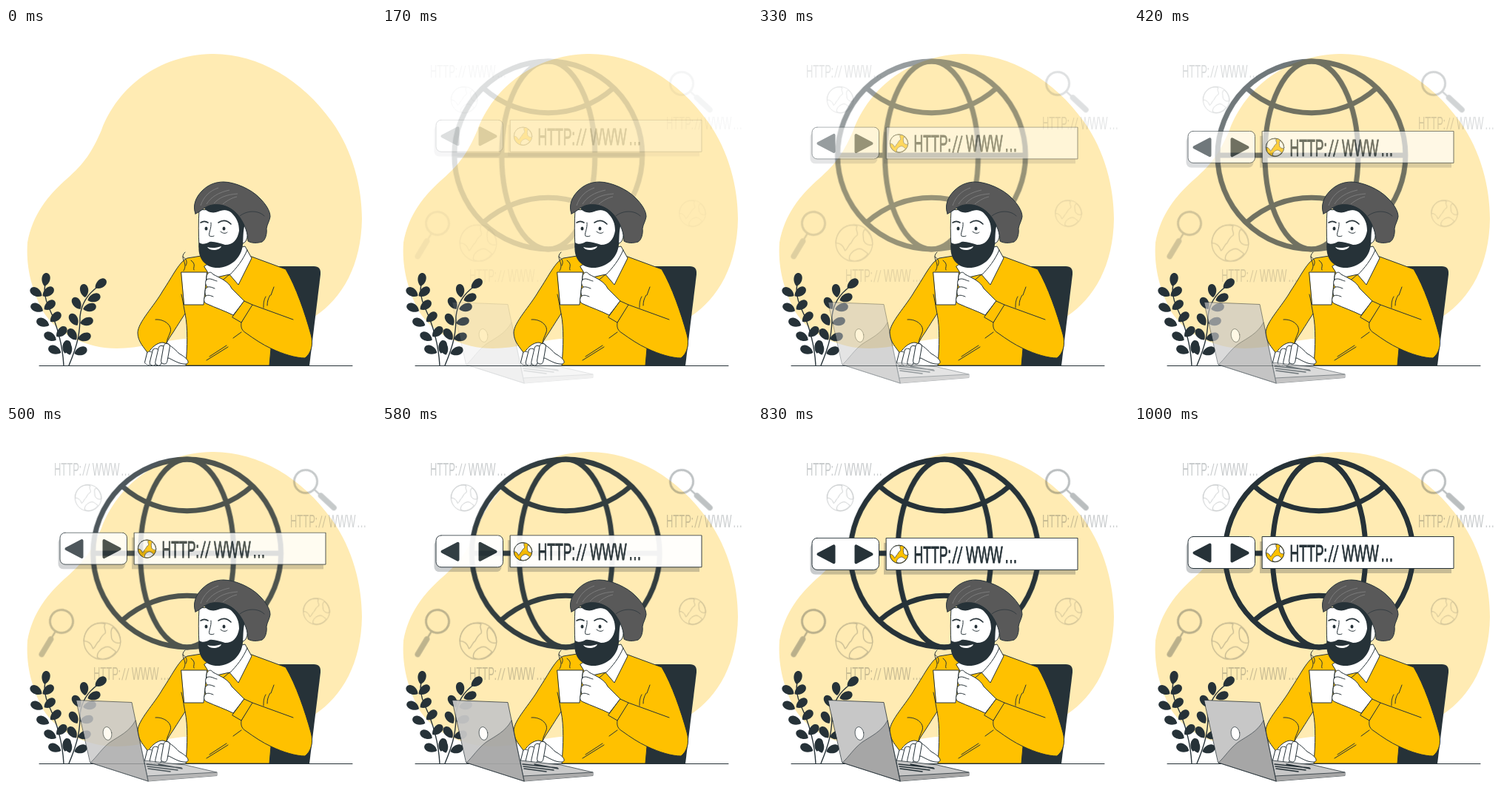
Animation, 500 px wide and 500 px high, one loop 1.04 s. Source, as an HTML page:

```html
<!DOCTYPE html>
<html lang="en">
<head>
<meta charset="utf-8">
<title>Browsing over coffee</title>
<style>
  html, body { margin: 0; width: 100%; height: 100%; overflow: hidden; background: #fff; }
  svg { display: block; width: 100%; height: 100%; }
  :root { --ink: #263238; --sun: #ffc100; --t: 0; }

  .line { fill: none; stroke: var(--ink); stroke-width: 1; stroke-linecap: round; stroke-linejoin: round; }
  .white { fill: #fff; }
  .sun { fill: var(--sun); }
  .ink { fill: var(--ink); }
  .url { font: 32px "Liberation Sans", Arial, sans-serif; }

  /* Scrubbed by --t (seconds), so every part shares one clock. */
  .enter {
    animation: fade 1s cubic-bezier(.36, -.01, .5, 1.38) both paused;
    animation-delay: calc(var(--t) * -1s);
  }
  .right { animation-name: slide-right; }
  .down { animation-name: slide-down; }
  @keyframes fade { from { opacity: 0; } to { opacity: 1; } }
  @keyframes slide-right {
    from { opacity: 0; transform: translateX(-30px); }
    to { opacity: 1; transform: translateX(0); }
  }
  @keyframes slide-down {
    from { opacity: 0; transform: translateY(-30px); }
    to { opacity: 1; transform: translateY(0); }
  }
</style>
</head>
<body>
<svg viewBox="0 0 500 500">
  <defs>
    <path id="leaf" d="M-1 9C-6 5 -7 -3 -4 -7C-1 -11 5 -9 5.500 -3C6 2 3 7 -1 9Z"/>
    <text id="url" class="url" transform="scale(.55 1)"><tspan x="0">HTTP</tspan><tspan x="83" letter-spacing="3" rotate="0 10 10">://</tspan><tspan x="128">WWW</tspan><tspan x="224" letter-spacing="1.500">...</tspan></text>
    <g id="lands">
      <path d="M-7 -10C-4 -12 0 -12 2 -11C0 -9 3 -7 2 -5C0 -4 -1 -2 -2 0C-4 1 -4 4 -6 5C-7 2 -9 0 -12 0C-12 -4 -10 -8 -7 -10Z"/>
      <path d="M-3 11C-4 8 -1 5 2 4C5 3 6 5 9 7C6 11 1 13 -3 11Z"/>
      <path d="M7 -9C10 -7 12 -3 12 1C9 2 6 0 6 -3C6 -5 5 -7 7 -9Z"/>
    </g>
    <g id="lens">
      <circle r="15.500" fill="none" stroke="var(--ink)" stroke-width="3"/>
      <path d="M15.500 0H25" stroke="var(--ink)" stroke-width="2.500"/>
      <path d="M28 0H52" stroke="var(--ink)" stroke-width="7.500" stroke-linecap="round"/>
    </g>
    <g id="world">
      <circle r="12" fill="none"/>
      <use href="#lands" fill="none"/>
    </g>
    <rect id="finger" class="line" style="fill:#fff" x="-4.200" y="-26" width="8.400" height="26" rx="4.200"/>
  </defs>

  <path fill="#ffebb3" d="M278 35C340 34 400 70 440 126C469 166 481 216 481 258C480 320 455 365 417 390C360 425 290 418 240 420C210 423 180 433 150 433C110 433 70 415 50 383C33 350 27 320 29 290C36 252 56 227 82 204C106 183 116 168 129 138C151 80 205 37 278 35Z"/>

  <!-- Faint floating icons -->
  <g class="enter">
    <g opacity=".26" class="ink">
      <use href="#url" transform="translate(65 66.500) scale(.735)"/>
      <use href="#url" transform="translate(384 137) scale(.735)"/>
      <use href="#url" transform="translate(118 343) scale(.735)"/>
    </g>
    <g opacity=".32">
      <use href="#lens" transform="translate(405 75) rotate(43)"/>
      <use href="#lens" transform="translate(75 264) rotate(121)"/>
    </g>
    <g opacity=".28" stroke="var(--ink)" stroke-width=".6" stroke-linejoin="round">
      <use href="#world" transform="translate(111 97) scale(1.480)"/>
      <use href="#world" transform="translate(130 290.500) scale(2.070)"/>
      <use href="#world" transform="translate(419.500 250.500) scale(1.480)"/>
    </g>
  </g>

  <g class="enter right" fill="none" stroke="var(--ink)" stroke-width="7">
    <circle cx="250" cy="172" r="127"/>
    <ellipse cx="250" cy="172" rx="63" ry="127"/>
    <path d="M123 172H377M162 81C212 126 288 126 338 81M162 263C212 218 288 218 338 263"/>
  </g>

  <!-- Address bar -->
  <g class="enter down">
    <g class="ink" opacity=".25">
      <rect x="70.500" y="156" width="91" height="43" rx="7"/>
      <rect x="170" y="156" width="259" height="43"/>
    </g>
    <g class="line">
      <rect class="white" x="73" y="149.500" width="90.500" height="43" rx="7"/>
      <rect class="white" x="173.500" y="149.500" width="258.500" height="43"/>
    </g>
    <path class="ink" stroke="var(--ink)" stroke-width="4" stroke-linejoin="round" d="M81.500 171.500L102.500 160.500V182.500ZM132.500 160.500L153.500 171.500L132.500 182.500Z"/>
    <g transform="translate(190.500 171.500)" class="line">
      <circle class="sun" r="12.300"/>
      <use href="#lands" fill="#fff" stroke-width=".7"/>
    </g>
    <use href="#url" class="ink" stroke="var(--ink)" stroke-width="1" transform="translate(210.500 183)"/>
  </g>

  <!-- Plants -->
  <path class="line" d="M78 456C76 420 66 395 58 378C52 365 51 355 53 345M85 456C98 425 100 410 100 390C102 370 112 358 125 349" style="stroke-width:1.400"/>
  <g id="leaves" class="ink"></g>

  <!-- Chair and sweater -->
  <path class="ink" d="M350 322H416Q426 322 425 333L410 456H350Z"/>
  <path class="line" style="fill:var(--sun)" d="M270 307L245 311C234 316 226 334 212 355C200 376 178 398 178 412C178 424 187 432 192 440L217 426C219 421 222 417 226 411C233 400 238 392 242 386C246 405 245 430 243 456H356L358 433C375 441 392 446 404 446C412 440 416 428 412 414C404 385 392 350 378 326L332 309Z"/>
  <path class="line" d="M202 394C214 393 225 402 222 411C220 417 217 421 217 426M242 386C240 376 239 368 237 360M333 374L388 394M332 374L318 398C317 405 319 409 324 412C335 420 347 428 358 433M362 350L358 361M351 363C348 368 348 373 348 378M357 361C354 366 353 370 353 375M271 449L300 431M275 444L298 429M307 419L318 411"/>

  <!-- Neck, collar, face -->
  <path class="line" style="fill:#fff" d="M268 322L300 300L323 295L332 311L314 347L302 333L284 337L274 332Z"/>
  <path class="line" d="M326 300C320 314 312 324 302 334M302 333L288 345"/>
  <path class="line" style="fill:#fff" d="M261 246C260 262 260 278 261 296C270 318 310 318 320 291C328 289 328 272 322 264L316 246Z"/>
  <path class="ink" d="M261 290C265 293 270 292 275 289C281 288 289 291 296 293C307 293 313 286 315 274C315 264 312 257 305 250C298 244 292 246 287 248C280 251 271 249 268 243L280 236H312L324 262C320 272 321 280 320 293C318 312 302 325 283 324C266 322 258 308 261 290Z"/>
  <path class="white" d="M272 296C278 298 285 297 291 295C289 301 275 302 272 296Z"/>
  <path class="line" style="stroke-width:1.600" d="M263 263C266 261 270 261 273 263M287 263C293 259 299 260 304 265"/>
  <path class="line" d="M277 263C278 271 273 278 275 281C277 282 279 282 281 281M290 275C293 278 297 278 299 276"/>
  <ellipse class="ink" cx="270.500" cy="271" rx="2" ry="2.600"/>
  <ellipse class="ink" cx="294.500" cy="271" rx="2" ry="2.600"/>

  <!-- Beanie -->
  <path class="line" style="fill:#595959" d="M256 251C252 240 256 229 265 220C274 211 284 208 294 208C309 208 332 218 343 230C351 238 357 247 357 255C356 261 353 265 352 271C353 279 350 287 346 289C339 291 332 291 327 288C327 278 323 266 316 256C307 243 293 237 279 239C269 240 264 248 256 251Z"/>
  <path fill="none" stroke="#858585" stroke-width=".8" d="M263 240C267 228 275 220 287 216M271 238C277 228 288 222 302 219M281 237C288 229 298 225 313 224M293 238C300 232 307 229 312 228"/>
  <path class="line" d="M316 254C326 246 341 246 349 254" style="stroke-width:.7"/>

  <!-- Coffee, hand and cuff -->
  <path class="line" d="M242 303C233 311 247 317 240 328M250 314C258 320 252 323 254 327M239 309C245 313 245 317 243 321"/>
  <path class="line" style="fill:#fff" d="M237 330H271.500L267 374H241Z"/>
  <path class="line" style="fill:#fff" d="M271 340C270 331 276 327 280 333C290 338 301 343 305 352L322 369L307 388C295 382 283 378 272 373C266 371 267 365 270 362C268 357 269 352 272 350C269 346 269 343 271 340Z"/>
  <path class="line" d="M271 340C276 337 280 341 285 342M272 350C276 349 279 351 282 352M270 362C274 360 277 362 280 363"/>
  <path class="line" style="fill:var(--sun)" d="M322 369L333 374L318 398L306 391Z"/>

  <path class="line" d="M45 456.500H468"/>

  <!-- Resting hand -->
  <path class="line" style="fill:#fff" d="M193 438C197 431 205 425 212 425C221 427 227 433 234 440C245 446 249 452 244 454C236 455 228 450 220 446L195 452Z"/>
  <use href="#finger" transform="translate(191 455) rotate(14) scale(1 .7)"/>
  <use href="#finger" transform="translate(197.500 456) rotate(14) scale(1 .9)"/>
  <use href="#finger" transform="translate(205 456) rotate(13) scale(1 1.050)"/>
  <use href="#finger" transform="translate(213 454) rotate(10) scale(1 1.080)"/>

  <!-- Laptop -->
  <g class="enter">
    <path class="line" style="fill:#c7c7c7;stroke-width:.8" d="M187 452L242 458L285 468V472.500L192 480Z"/>
    <path fill="#a6a6a6" d="M191 473L285 468V472.500L192 480Z"/>
    <path class="line" style="stroke-width:.8" d="M191 473L285 468"/>
    <path class="line" style="stroke-width:1.500" d="M190 457L237 462M191 460L232 465M192 463L222 467M206 457L238 463"/>
    <path fill="#c7c7c7" d="M95 370.500L170 373.500L192 480L114 455Z"/>
    <path class="line" style="fill:#a6a6a6;stroke-width:.6" d="M175 398C167 413 153 419 141 427C129 436 123 447 114 455L192 480Z"/>
    <path class="line" style="stroke-width:.8" d="M95 370.500L170 373.500L192 480L114 455Z"/>
    <ellipse class="line" style="fill:#fff;stroke-width:.7" cx="137" cy="415.500" rx="5.800" ry="9" transform="rotate(-10 137 415.500)"/>
  </g>
</svg>
<script>
  // Leaf centre x, y and tilt in degrees.
  const leaves = [
    [54, 340, 5], [41, 357, -62], [57, 357, 48], [42, 378, -68], [59, 375, 48], [50, 398, -72],
    [67, 391, 45], [60, 417, -65], [75, 411, 42], [66, 435, -72], [82, 431, 10],
    [128, 346, 48], [106, 355, -12], [119, 365, 65], [96, 372, -35], [113, 378, 72],
    [92, 394, -35], [109, 397, 72], [90, 414, -40], [106, 418, 70], [101, 437, 65], [84, 433, -22]
  ];
  document.getElementById("leaves").innerHTML = leaves
    .map(([x, y, tilt]) => `<use href="#leaf" transform="translate(${x} ${y}) rotate(${tilt})"/>`)
    .join("");

  const LOOP = 1040, FPS = 24;
  const root = document.documentElement;
  const start = performance.now();

  // Time advances in 24 fps steps, each starting on a whole hundredth of a second.
  function tick() {
    const ms = (performance.now() - start) % LOOP;
    const step = Math.floor((Math.floor(ms / 10) + .49) * FPS / 100);
    root.style.setProperty("--t", step < 2 ? 0 : Math.min(1, (step + 1) / FPS));
    requestAnimationFrame(tick);
  }
  tick();
</script>
</body>
</html>
```
